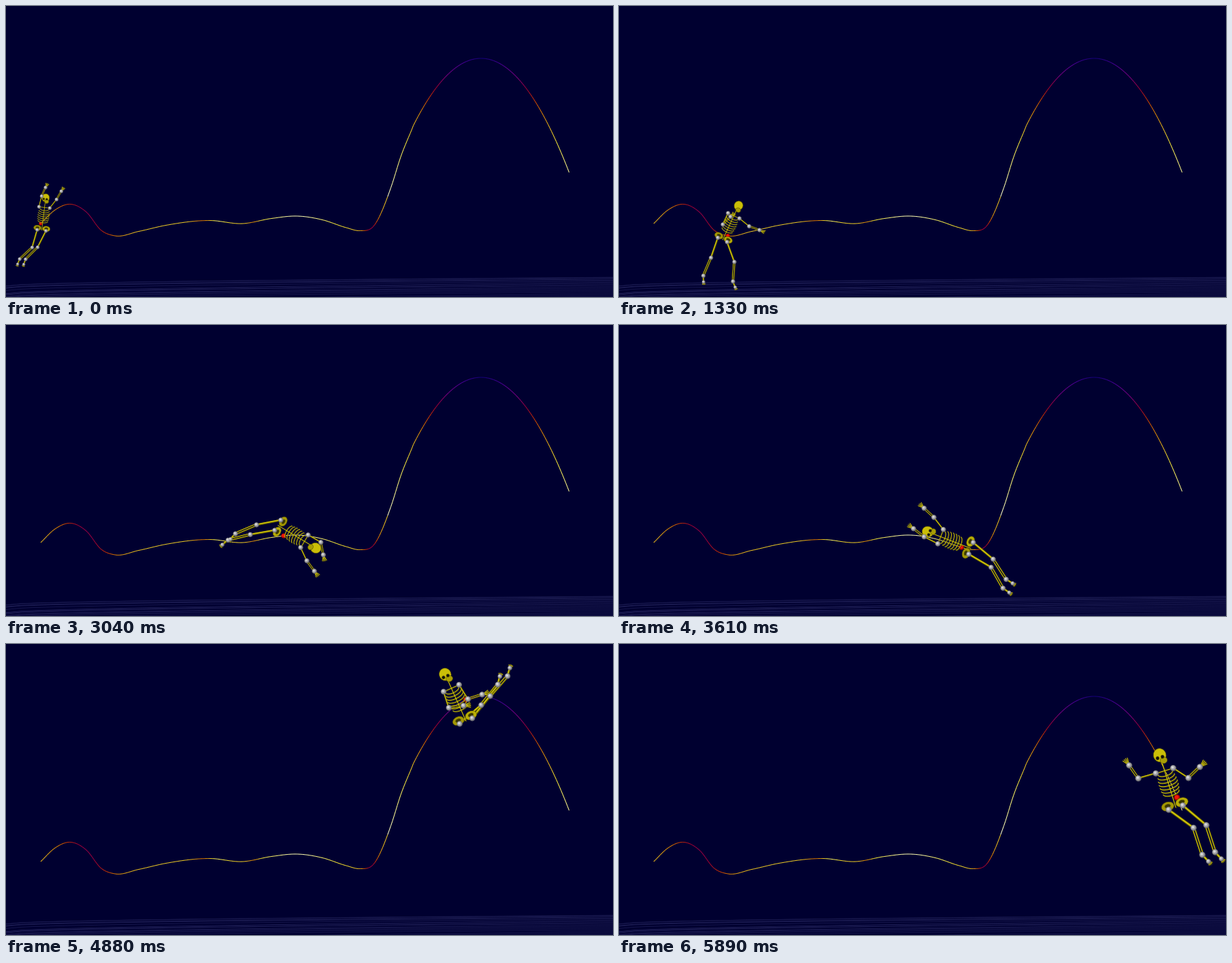
These frames come from a looping animation (892 by 428 pixels, 6020 ms). A matplotlib script:

```python
import random

import numpy as np
import matplotlib.pyplot as plt
from matplotlib.animation import FuncAnimation
from matplotlib.collections import LineCollection, PolyCollection
from matplotlib.colors import LinearSegmentedColormap

W, H, DPI = 892, 428, 100
PX = 72 / DPI
LOOP, STEP = 6020, 35
BACK = "#000030"
BRIGHT, DARK = "#d2c60a", "#5f5a00"

# Bone lengths at the start; the figure grows as it nears the camera
TRUNK, NECK, SHOULDER, HIP = 34, 13.5, 8, 6.5
UPPER_ARM, FOREARM, THIGH, SHIN, FOOT = 16, 14, 27, 25, 8
GROWTH = 0.67

# Angles from the trunk, clockwise in degrees, left then right:
# upper arms, forearms, thighs, shins
POSES = dict(
    reach=(7, 31, 17, 23, 189, 200, 220, 218),
    run=(180, 104, 20, 85, 174, 135, 178, 159),
    handstand=(-23, 29, 1, -4, 199, 166, 199, 165),
    arch=(-1, 34, 48, 23, 138, 139, 126, 135),
    takeoff=(-131, 95, -56, 140, 179, 186, 163, 175),
    pike=(-174, 172, 106, 96, 73, 63, 63, 65),
    landing=(-89, 140, -18, 63, 143, 147, 179, 179),
)
# Time, pose, lean of the trunk (it keeps turning clockwise)
ROUTINE = [
    (0, "reach", -83), (600, "reach", -85), (1330, "run", -65),
    (2030, "handstand", 77), (2700, "reach", 257), (3040, "arch", 391),
    (3300, "handstand", 437), (3650, "reach", 575), (3850, "reach", 630),
    (4120, "takeoff", 659), (4450, "pike", 770), (4880, "pike", 966),
    (5400, "pike", 1172), (5890, "landing", 1333),
]
TIMES = np.array([r[0] for r in ROUTINE], float)
ANGLES = np.array([POSES[r[1]] for r in ROUTINE], float)
LEANS = np.array([r[2] for r in ROUTINE], float)

# Path of the centre of mass: run-up points, then a ballistic arc
RUN = np.array([
    (51, 320), (72, 300), (95, 291.5), (118, 303), (140, 330), (160, 338),
    (195, 331.5), (235, 322.5), (300, 315.5), (348, 320), (390, 312.5),
    (428, 309), (465, 314.5), (500, 326), (520, 330.5), (540, 324),
    (566, 266), (580, 222), (597, 180)], float)
APEX_X, APEX_Y, CURVE = 698, 77, 0.01
PACE = np.array([(0, 51), (1330, 160), (2030, 241), (3040, 408),
                 (4120, 582), (4880, 676), (5890, 820)], float)


def spline(t, ts, vs):
    """Cubic Hermite curve through (ts, vs)."""
    m = np.gradient(vs, ts)
    i = np.clip(np.searchsorted(ts, t, side="right") - 1, 0, len(ts) - 2)
    h = ts[i + 1] - ts[i]
    u = (t - ts[i]) / h
    return ((1 + 2 * u) * (1 - u) ** 2 * vs[i] + u * (1 - u) ** 2 * h * m[i]
            + u * u * (3 - 2 * u) * vs[i + 1] + u * u * (u - 1) * h * m[i + 1])


def height(x):
    ground = spline(np.minimum(x, RUN[-1, 0]), RUN[:, 0], RUN[:, 1])
    return np.where(x < RUN[-1, 0], ground, APEX_Y + CURVE * (x - APEX_X) ** 2)


def com(t):
    x = spline(t, PACE[:, 0], PACE[:, 1])
    return x + 1j * float(height(x))


def bump(x, centre, width):
    return np.exp(-((x - centre) / width) ** 2)


def heat_at(x):
    """Speed colour: dips on the ground, then slowest at the apex."""
    ground = (0.71 + 0.2 * bump(x, 428, 45) + 0.1 * bump(x, 310, 12)
              - 0.28 * bump(x, 118, 45) - 0.13 * bump(x, 287, 14)
              - 0.12 * bump(x, 362, 9) - 0.27 * bump(x, 535, 13))
    return np.where(x < 560, ground, np.minimum(1, 0.0068 * abs(x - APEX_X)))


def xy(z):
    z = np.asarray(z)
    return np.column_stack([z.real, z.imag])


def turn(deg):
    return np.exp(1j * np.radians(deg))


def unit(z):
    return z / max(abs(z), 1e-6)


def skeleton(t, s):
    """Joint places as complex numbers, hung on the centre of mass."""
    i = min(np.searchsorted(TIMES, t, side="right"), len(TIMES) - 1)
    u = np.clip((t - TIMES[i - 1]) / (TIMES[i] - TIMES[i - 1]), 0, 1)
    u = u * u * (3 - 2 * u)
    angles = (1 - u) * ANGLES[i - 1] + u * ANGLES[i]
    up = turn(spline(t, TIMES, LEANS))
    arm, fore, thigh, shin = (angles.reshape(4, 2))
    sides = np.array([-1, 1])

    j = {"pelvis": 0j, "neck": TRUNK * up, "head": (TRUNK + NECK) * up}
    j["shoulder"] = (TRUNK + 1j * SHOULDER * sides) * up
    j["elbow"] = j["shoulder"] + UPPER_ARM * turn(arm) * up
    j["wrist"] = j["elbow"] + FOREARM * turn(fore) * up
    j["hip"] = 1j * HIP * sides * up
    j["knee"] = j["hip"] + THIGH * turn(thigh) * up
    j["ankle"] = j["knee"] + SHIN * turn(shin) * up
    j["toe"] = j["ankle"] + FOOT * turn(shin - 25) * up

    mass = (0.55 * 0.45 * j["neck"] + 0.1 * j["head"] + 0.05 * j["elbow"].sum()
            + 0.08 * j["knee"].sum() + 0.045 * j["ankle"].sum())
    return {k: com(t) + s * (z - mass) for k, z in j.items()}, up


def limb_bones(j, s):
    """Limb segments with their widths; forearms and shins are double."""
    chain = [("shoulder", "elbow", 1.5, 0), ("elbow", "wrist", 0.9, 0.8),
             ("hip", "knee", 2.4, 0), ("knee", "ankle", 1.2, 1),
             ("ankle", "toe", 2.2, 0)]
    bones = []
    for a, b, width, gap in chain:
        for p, q in zip(j[a], j[b]):
            off = 1j * unit(q - p) * gap * s
            for o in ([off, -off] if gap else [0]):
                bones.append((xy([p + o, q + o]), width * s))
    return bones


def fan(base, way, length, spread):
    return [(base, base + way * length * turn(a))
            for a in np.linspace(-spread, spread, 4)]


def fine_bones(j, s, up):
    """Spine, collar bones, ribs, fingers and toes."""
    lines = [(j["pelvis"], j["head"]), tuple(j["shoulder"])]
    a = np.linspace(0, np.pi, 11)
    for f in np.linspace(0.42, 0.95, 7):
        half = 8.5 * np.sqrt(1 - ((f - 0.66) / 0.48) ** 2)
        c = j["pelvis"] + f * (j["neck"] - j["pelvis"])
        lines.append(c + s * up * (1j * half * np.cos(a) - 3 * np.sin(a)))
    for k in (0, 1):
        hand, foot = j["wrist"][k], j["toe"][k]
        lines += fan(hand, unit(hand - j["elbow"][k]), 7 * s, 20)
        lines += fan(foot, unit(foot - j["ankle"][k]), 3.5 * s, 35)
    return [xy(z) for z in lines]


def oval(c, rx, ry, axis):
    a = np.linspace(0, 2 * np.pi, 20)
    return xy(c + (rx * np.cos(a) + 1j * ry * np.sin(a)) * axis)


def solids(j, s, up):
    """Pelvis, skull, jaw and eyes."""
    across = 1j * up
    shapes = [oval(h + 3 * s * up, 5.6 * s, 4 * s, across) for h in j["hip"]]
    shapes += [oval(h + 3.4 * s * up, 2.6 * s, 1.6 * s, across) for h in j["hip"]]
    shapes.append(oval(j["head"] + 0.8 * s * up, 6 * s, 5.6 * s, up))
    shapes.append(oval(j["head"] + s * (2 * across - 4.5 * up), 2.8 * s, 3.2 * s, up))
    # the face shows unless the body leans to the right
    eye = 1.5 * s if up.real < 0.2 else 0
    shapes += [oval(j["head"] + s * (d * across - 1.2 * up), eye, eye, up)
               for d in (-2.6, 1.9)]
    return shapes


# Stage
fig = plt.figure(figsize=(W / 100, H / 100), dpi=DPI, facecolor=BACK)
ax = fig.add_axes([0, 0, 1, 1])
ax.set_xlim(0, W)
ax.set_ylim(H, 0)
ax.axis("off")

# Floor
rng = random.Random(4)
fx = np.linspace(0, W, 40)
edge = 412 - 13 * np.sqrt(fx / W)
planks = []
for k in range(18):
    depth = (k / 17) ** 1.3 * 28
    tilt = rng.uniform(-1.5, 4) * (k > 0)
    planks.append(np.column_stack([fx, edge + depth + tilt * (1 - fx / W)]))
ax.add_collection(LineCollection(planks, colors="#1c1c52", linewidths=0.8 * PX,
                                 zorder=0.1))

# Coloured path
heat = LinearSegmentedColormap.from_list("heat", [
    (0, "#14007a"), (0.2, "#4b0096"), (0.35, "#7d0082"), (0.45, "#a00032"),
    (0.52, "#c83200"), (0.6, "#dc8200"), (0.75, "#f5e632"), (0.9, "#ffffaa"),
    (1, "#ffffff")])
px = np.linspace(51, 827.5, 330)
pts = np.column_stack([px, height(px)])
ax.add_collection(LineCollection(np.stack([pts[:-1], pts[1:]], 1),
                                 colors=heat(heat_at(px[:-1])),
                                 linewidths=1.05 * PX, zorder=1))


# Skeleton parts
def lines(color, z):
    return ax.add_collection(LineCollection([], colors=color, zorder=z))


under, over = lines(DARK, 2), lines(BRIGHT, 2.1)
rib_shade, ribs = lines("#4a4600", 2.2), lines(BRIGHT, 2.3)
body = ax.add_collection(PolyCollection(
    [], facecolors=["#a39804", "#b9ad06"] + ["#3a3700"] * 2
    + ["#cabe08", "#a89d06"] + ["#14120c"] * 2,
    edgecolors=DARK, linewidths=0.6 * PX, zorder=2.4))
mass = ax.scatter([0, 0], [0, 0], c=["#a80000", "#f01808"], linewidths=0, zorder=1.9)
BALLS = ("shoulder", "elbow", "wrist", "hip", "knee", "ankle", "toe")
count = 2 * len(BALLS)
balls = ax.scatter(np.zeros(3 * count), np.zeros(3 * count), linewidths=0, zorder=2.6,
                   c=np.repeat(["#6c6c70", "#a4a4a8", "#d8d8da"], count))


def area(r):
    return (2 * np.asarray(r) * PX) ** 2


def held_time(i):
    """Start of the pose on show: holds of 130 and 60 ms alternate."""
    n, rest = divmod(STEP * i + STEP - 1, 190)
    return n * 190 + (130 if rest >= 130 else 0)


def draw(i):
    t = held_time(i)
    s = 1 + GROWTH * t / TIMES[-1]
    j, up = skeleton(t, s)
    light = (-0.25 - 0.3j) * s

    segs, widths = zip(*limb_bones(j, s))
    widths = np.array(widths) * PX
    under.set_segments(segs)
    under.set_linewidths(widths)
    over.set_segments([g - 0.3 * s for g in segs])
    over.set_linewidths(0.5 * widths)

    fine = fine_bones(j, s, up)
    rib_shade.set_segments([g + 0.5 * s for g in fine])
    ribs.set_segments(fine)
    for part in (rib_shade, ribs):
        part.set_linewidths(0.65 * s * PX)
    body.set_verts(solids(j, s, up))

    spots = np.concatenate([j[k] for k in BALLS])
    r = np.full(count, 2.7 * s)
    r[-2:] *= 0.8
    balls.set_offsets(xy(np.concatenate([spots, spots + light, spots + 2 * light])))
    balls.set_sizes(area(np.concatenate([r, 0.78 * r, 0.4 * r])))

    mass.set_offsets(xy([com(t), com(t) + light]))
    mass.set_sizes(area([2.7 * s, 1.8 * s]))
    return []


anim = FuncAnimation(fig, draw, frames=LOOP // STEP, interval=STEP,
                     init_func=lambda: [], repeat=True, repeat_delay=0,
                     cache_frame_data=False)
plt.show()
```
